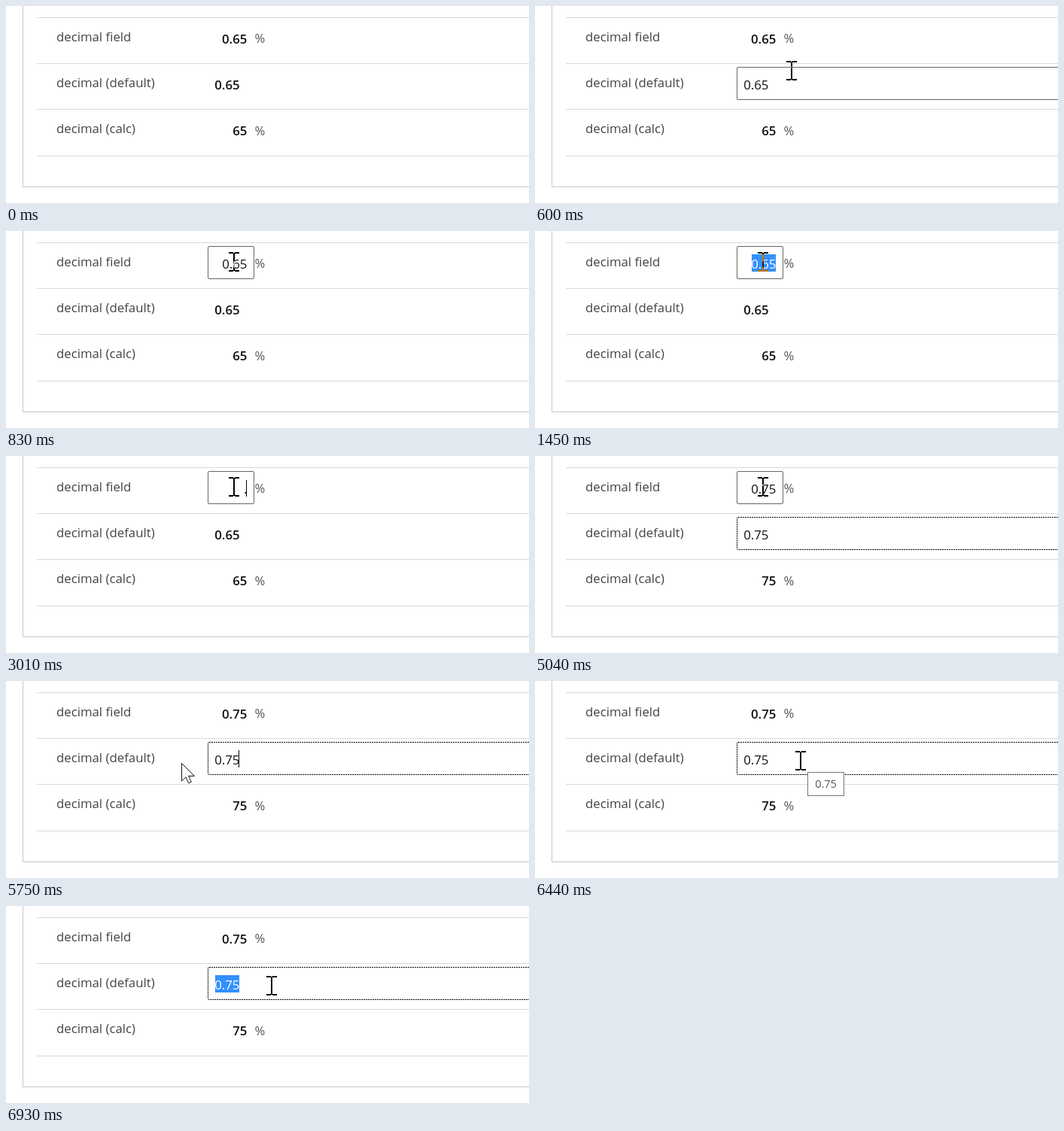
Recreate the animation shown at these times as an HTML page. Size 695 px wide and 262 px high, loop 8000 ms.

```html
<!DOCTYPE html>
<html lang="en">
<head>
<meta charset="utf-8">
<title>Decimal fields</title>
<style>
  html, body { margin: 0; width: 100%; height: 100%; overflow: hidden; background: #fff; }
  svg { display: block; width: 695px; height: 262px; }
  text { font: 400 16.8px "Open Sans", "Noto Sans", sans-serif; white-space: pre; }
  .label { fill: #444; }
  .unit { fill: #555; }
  .value { fill: #111; }
  .bold { font-weight: 600; }
  .end { text-anchor: end; }
  .line { stroke: #d8d8d8; }
  .box { fill: #fff; stroke: #666; }
  .focus { stroke: #000; stroke-dasharray: 2 1; }
  .picked { fill: #fff; }
  .select { fill: #3390ff; }
  #beam { fill: #fff; mix-blend-mode: difference; }
  .crisp { shape-rendering: crispEdges; }
</style>
</head>
<body>
<svg viewBox="0 0 695 262">
  <rect width="695" height="262" fill="#fff"/>
  <path class="crisp" d="M22.5 0V240.5H695" fill="none" stroke="#c8c8c8"/>
  <g class="line crisp">
    <path d="M41 15.5H695M41 76.5H695M41 137.5H695M41 199.5H695"/>
  </g>

  <text class="label" x="67" y="47">decimal field</text>
  <text class="label" x="67" y="108">decimal (default)</text>
  <text class="label" x="67" y="169">decimal (calc)</text>
  <text class="unit" x="330.5" y="49">%</text>
  <text class="unit" x="330.5" y="172">%</text>

  <rect id="fieldBox" class="box" x="268.5" y="20.5" width="61" height="43" rx="1.5"/>
  <rect id="fieldSel" class="select" x="288" y="31" width="32" height="23"/>
  <text id="field" class="value end" x="320.4" y="50"></text>
  <rect id="fieldCaret" x="319" y="32" width="1" height="22"/>

  <rect id="plainBox" class="box" x="268.5" y="81.5" width="440" height="43" rx="1.5"/>
  <rect id="plainSel" class="select" x="278" y="92" width="32" height="23"/>
  <text id="plain" class="value" x="277.2" y="111"></text>
  <rect id="plainCaret" x="309" y="92" width="1" height="23"/>

  <text id="calc" class="value bold end" x="320.4" y="172"></text>

  <g id="tip">
    <rect x="362.5" y="121.5" width="48" height="31" fill="#fff" stroke="#767676"/>
    <text x="386.5" y="142" text-anchor="middle" fill="#575757" style="font-size:14.5px">0.75</text>
  </g>
  <circle id="ring" r="17.4" fill="none" stroke="#333"/>
  <path id="arrow" d="M.5 .5V24L6 18.8L9.7 26.8L13.2 25.2L9.6 17.4H17.3Z" fill="#fff" stroke="#111"/>
  <path id="beam" class="crisp" d="M-7-13H-1V-12H1V-13H7V-11H1V11H7V13H1V12H-1V13H-7V11H-1V-11H-7Z"/>
</svg>
<script>
const LOOP = 8000;
const $ = id => document.getElementById(id);
const start = {
  cursor: "", x: 0, y: 0, hover: "", focus: "", picked: "", caret: "",
  field: "0.65", plain: "0.65", calc: "65", ring: false, tip: false
};
const arrow = (x, y) => ({ cursor: "arrow", x, y, hover: "" });
const beam = (x, y, hover) => ({ cursor: "beam", x, y, hover });

// Each step changes part of the state and holds until the next.
const steps = [
  [220, arrow(372, 243)],
  [300, arrow(368, 220)],
  [370, arrow(363, 188)],
  [450, arrow(356, 150)],
  [520, beam(349, 113, "plain")],
  [600, beam(341, 86, "plain")],
  [680, beam(323, 56, "field")],
  [760, beam(308, 44, "field")],
  [830, beam(303, 41, "field")],
  [1210, { ring: true, focus: "field" }],
  [1300, { ring: false }],
  [1450, { picked: "field" }],
  [3010, { picked: "", field: ".", caret: "field" }],
  [3410, { field: ".7" }],
  [3790, { field: ".75" }],
  [4340, { focus: "plain", picked: "plain", caret: "" }],
  [4490, { field: "0.75", plain: "0.75", calc: "75", picked: "", caret: "plain" }],
  [5040, { caret: "" }],
  [5510, { caret: "plain" }],
  [5680, arrow(258, 74)],
  [5750, arrow(233, 109)],
  [5830, arrow(246, 124)],
  [5910, beam(298, 115, "plain")],
  [5980, beam(338, 108, "plain")],
  [6060, { ...beam(353, 106, "plain"), caret: "" }],
  [6440, { tip: true }],
  [6610, { tip: false, ring: true }],
  [6760, { picked: "plain" }],
  [6930, { ring: false }]
];

const show = (id, on) => { $(id).style.display = on ? "" : "none"; };

function drawInput(id, s) {
  const open = s.hover === id || s.focus === id;
  show(id + "Box", open);
  show(id + "Sel", s.picked === id);
  show(id + "Caret", s.caret === id);
  $(id).textContent = s[id];
  $(id).classList.toggle("bold", !open);
  $(id).classList.toggle("picked", s.picked === id);
}

function draw(s) {
  drawInput("field", s);
  drawInput("plain", s);
  $("plainBox").classList.toggle("focus", s.focus === "plain");
  $("calc").textContent = s.calc;
  for (const id of ["arrow", "beam"]) {
    show(id, s.cursor === id);
    $(id).setAttribute("transform", `translate(${s.x} ${s.y})`);
  }
  show("ring", s.ring);
  $("ring").setAttribute("cx", s.x - 3);
  $("ring").setAttribute("cy", s.y - 2);
  show("tip", s.tip);
}

const states = [start];
for (const [, change] of steps) states.push({ ...states.at(-1), ...change });

const t0 = performance.now();
let shown = -1;
function tick(now) {
  const t = Math.max(0, now - t0) % LOOP;
  const n = steps.filter(([at]) => at <= t).length;
  if (n !== shown) draw(states[shown = n]);
  requestAnimationFrame(tick);
}
tick(t0);
</script>
</body>
</html>
```
